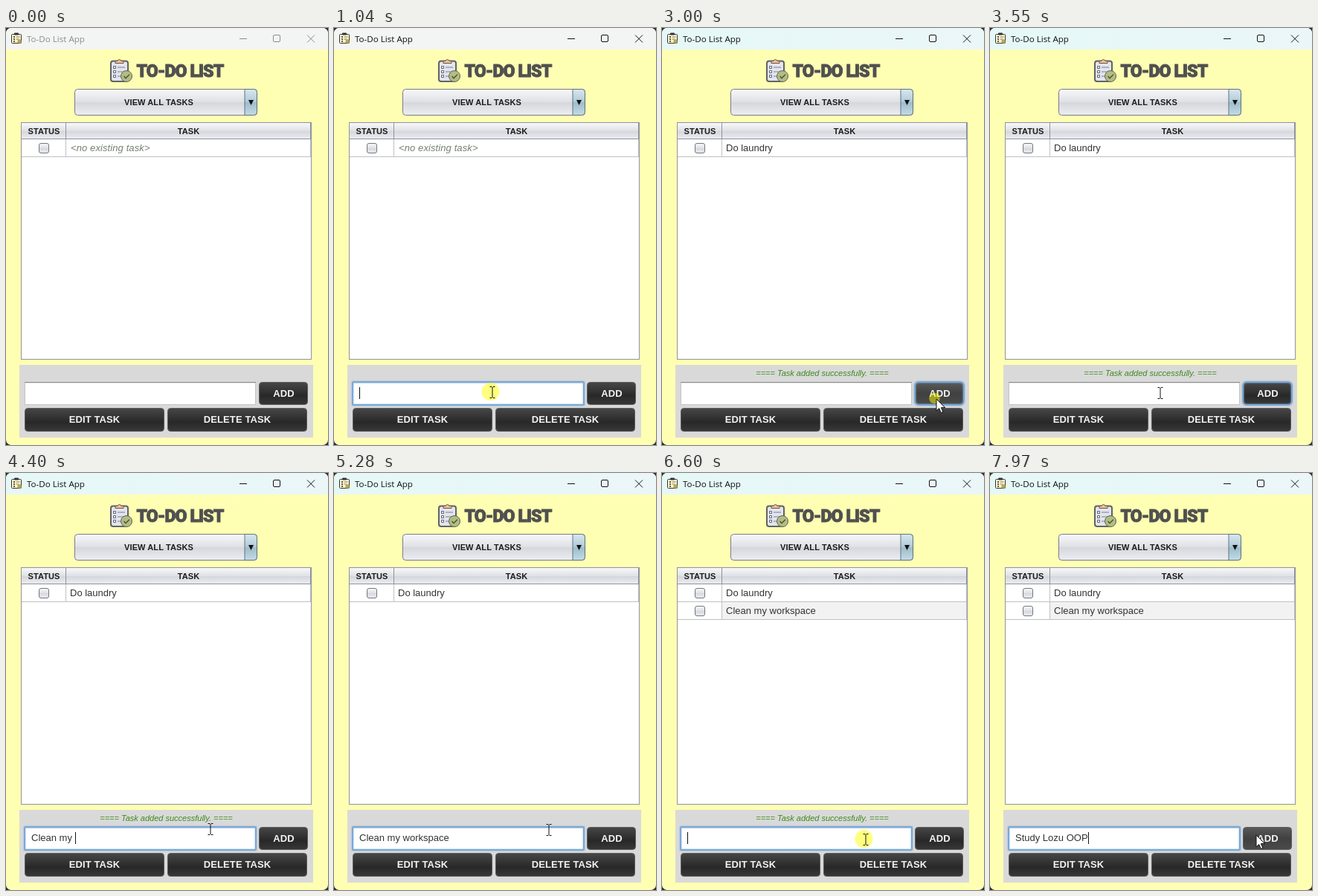
An HTML page that plays this animation: 433 px wide and 562 px high, repeating every 8 s.

```html
<!DOCTYPE html>
<html lang="en">
<head>
<meta charset="utf-8">
<title>To-Do List App</title>
<style>
  html, body { margin: 0; width: 100%; height: 100%; overflow: hidden; background: #262b35; }
  svg { display: block; width: 433px; height: 562px; }
  text { font: 13px "Liberation Sans", Arial, sans-serif; fill: #333; white-space: pre; }
  .mid { text-anchor: middle; }
  .head { font-size: 11px; font-weight: bold; letter-spacing: .1px; fill: #1c1c1c; }
  .label { font-weight: bold; letter-spacing: .1px; fill: #f4f4f4; text-anchor: middle; }
  .italic { font-style: italic; letter-spacing: .1px; fill: #75806f; }
  .message { font-size: 11px; font-style: italic; fill: #3f8a1c; text-anchor: middle; }
  .app-name { font: 11.6px "Open Sans", sans-serif; fill: currentColor; }
  .title {
    font: 900 30px sans-serif; font-stretch: 50%; letter-spacing: -.04em;
    fill: #505050; stroke: #505050; stroke-width: .9;
  }
  .line { fill: none; stroke: currentColor; }
  .button rect { fill: url(#dark); stroke: #5c5c5c; }
  .button.hover rect { fill: url(#darkHover); }
  .ring { fill: none; stroke: #7aa8d6; stroke-width: 2; filter: drop-shadow(0 0 1px #8fbbe4); }
</style>
</head>
<body>
<svg viewBox="0 0 433 562">
  <defs>
    <linearGradient id="silver" x2="0" y2="1">
      <stop stop-color="#f8f8fa"/><stop offset=".48" stop-color="#dfe1e5"/>
      <stop offset=".52" stop-color="#d5d7dd"/><stop offset="1" stop-color="#eceef1"/>
    </linearGradient>
    <linearGradient id="blue" x2="0" y2="1">
      <stop stop-color="#d9e7ee"/><stop offset=".48" stop-color="#b0cad7"/>
      <stop offset=".52" stop-color="#9dbccb"/><stop offset="1" stop-color="#c4dbe5"/>
    </linearGradient>
    <linearGradient id="dark" x2="0" y2="1">
      <stop stop-color="#474747"/><stop offset=".45" stop-color="#303030"/>
      <stop offset=".6" stop-color="#282828"/><stop offset="1" stop-color="#383838"/>
    </linearGradient>
    <linearGradient id="darkHover" x2="0" y2="1">
      <stop stop-color="#5a5a5a"/><stop offset=".5" stop-color="#404040"/><stop offset="1" stop-color="#4b4b4b"/>
    </linearGradient>
    <linearGradient id="tint">
      <stop stop-color="#e5f8f7"/><stop offset="1" stop-color="#ebf6f9"/>
    </linearGradient>
    <clipPath id="window"><rect width="433" height="562" rx="7"/></clipPath>
    <g id="checkbox">
      <rect x="44.5" y="-6.5" width="13" height="13" rx="2.500" fill="url(#silver)" stroke="#74777e"/>
    </g>
  </defs>

  <g clip-path="url(#window)">
    <rect width="433" height="562" fill="#ffffb3"/>
    <rect width="433" height="29" fill="#f3f4f4"/>
    <rect id="barTint" width="433" height="29" fill="url(#tint)"/>
  </g>

  <g>
    <rect x="7.5" y="8.5" width="13" height="12" rx="1" fill="#fff6cf" stroke="#333"/>
    <rect x="11" y="6.5" width="6" height="3" rx="1" fill="#333"/>
    <path d="M10 12h2m-2 3h2m-2 3h2" stroke="#222" stroke-width="1.6"/>
    <path d="M13.5 12h5m-5 3h4" stroke="#777"/>
    <circle cx="18" cy="18" r="2.7" fill="#b9a650"/>
  </g>
  <g id="chrome">
    <text class="app-name" x="28" y="19">To-Do List App</text>
    <path class="line" d="M314 14.5h10M405 9.500l10 10m0-10l-10 10"/>
    <rect class="line" x="359.500" y="9.500" width="9" height="9" rx="1.500"/>
  </g>

  <g>
    <rect x="141" y="44.500" width="23" height="27.500" rx="3" fill="#e2e5ee" stroke="#626266" stroke-width="2"/>
    <path d="M147 47.500v-3h3a2.600 2.600 0 0 1 5 0h3v3z" fill="#efc39a" stroke="#6b5548"/>
    <path d="M144.500 51.500h3v3h-3zm0 6h3v3h-3zm0 6h3v3h-3z" fill="#fff" stroke="#62656e"/>
    <path d="M150 53h10m-10 6h9m-9 6h4" stroke="#9ba0b2" stroke-width="1.500"/>
    <circle cx="162" cy="65" r="7.500" fill="#b3bc83" stroke="#62664f"/>
    <path d="M158.500 65l2.500 2.700 4.800-5" fill="none" stroke="#4d553c" stroke-width="1.500"/>
  </g>
  <text id="title" class="title" x="175.500">TO-DO LIST</text>

  <rect x="92.500" y="82.500" width="245" height="35" rx="4" fill="url(#silver)" stroke="#777c86"/>
  <path d="M321 82.500h12.500a4 4 0 0 1 4 4v27a4 4 0 0 1-4 4H321z" fill="url(#blue)" stroke="#5b7482"/>
  <path d="M326 97h7l-3.500 7z" fill="#111"/>
  <text class="head mid" x="205.500" y="104">VIEW ALL TASKS</text>

  <rect x="20.500" y="127.500" width="390" height="319" fill="#fff" stroke="#8f93a0"/>
  <rect x="21" y="128" width="389" height="22" fill="url(#silver)"/>
  <path d="M21 149.500h389M80.500 128v21M409.500 128v21" stroke="#8f93a0"/>
  <path d="M21 173.500h389M80.500 150v24M409.500 150v24" stroke="#bfc1c5"/>
  <text class="head mid" x="51" y="143">STATUS</text>
  <text class="head mid" x="245.500" y="143">TASK</text>
  <use href="#checkbox" y="162"/>
  <text id="empty" class="italic" x="87" y="166">&lt;no existing task&gt;</text>
  <text id="first" x="86" y="166">Do laundry</text>
  <g id="second">
    <rect x="81" y="174" width="329" height="23" fill="#f2f2f2"/>
    <path d="M21 197.500h389M80.500 174v24M409.500 174v24" stroke="#bfc1c5"/>
    <use href="#checkbox" y="186"/>
    <text x="86" y="190">Clean my workspace</text>
  </g>

  <rect x="18" y="454" width="395" height="98" fill="#d9d9d9"/>
  <text id="message" class="message" x="215.500" y="469">==== Task added successfully. ====</text>
  <rect x="25.500" y="477.500" width="310" height="30" fill="#fff" stroke="#c4c4c4"/>
  <path d="M25 477.500h311" stroke="#8d8d8d"/>
  <path d="M26 478.500h309" stroke="#e0e0e0"/>
  <rect id="fieldRing" class="ring" x="25" y="477" width="311" height="31" rx="1"/>
  <text id="typed" x="34" y="496"></text>
  <path id="caret" d="M.5 484v16" stroke="#111"/>

  <g id="add" class="button">
    <rect x="340.500" y="477.500" width="65" height="30" rx="4"/>
    <text class="label" x="373.500" y="497">ADD</text>
  </g>
  <rect id="addRing" class="ring" x="340" y="477" width="66" height="31" rx="5"/>
  <g class="button">
    <rect x="25.500" y="512.500" width="187" height="31" rx="4"/>
    <text class="label" x="119" y="532">EDIT TASK</text>
  </g>
  <g id="delete" class="button">
    <rect x="217.500" y="512.500" width="187" height="31" rx="4"/>
    <text class="label" x="311" y="532">DELETE TASK</text>
  </g>

  <g id="pointer">
    <circle id="halo" cx="-2.500" cy="-1" fill="#ff0" fill-opacity=".5"/>
    <path id="beam" d="M-3.500-7.500h2.500l1 1 1-1h2.500M0-6.500v13M-3.500 7.500h2.500l1-1 1 1h2.500" fill="none" stroke="#111"/>
    <path id="arrow" d="M0 0v16l3.700-3.500 2.500 6 2.700-1.100-2.500-5.800h5.200z" fill="#fff" stroke="#111"/>
  </g>
</svg>

<script>
const LOOP = 8000;
const ACTIVATED = 950;
const BLINK = 500;

const typing = [
  { text: "Do laundry", focus: 950, start: 1450, end: 2230, sent: 2980 },
  { text: "Clean my workspace", focus: 3990, start: 4030, end: 4770, sent: 5720 },
  { text: "Study Lozu OOP", focus: 6540, start: 6620, end: 7560, sent: LOOP }
];
const messages = [[2980, 4800], [5720, 7390]];
const clicks = [920, 2800, 3990, 5700, 6540];

// time, x, y of the pointer's hot spot
const path = [
  [100, 310, 575], [900, 213, 491], [1040, 213, 491], [1240, 215, 493], [2320, 215, 493],
  [2750, 369, 500], [3150, 369, 500], [3550, 229, 492], [3700, 215, 490],
  [3950, 275, 480], [5180, 275, 479], [5600, 370, 493], [5850, 370, 493],
  [6450, 274, 494], [7450, 274, 494], [7930, 358, 488], [LOOP, 358, 488]
];

const $ = id => document.getElementById(id);
const show = (id, on) => { $(id).style.visibility = on ? "visible" : "hidden"; };
const clamp = v => Math.min(1, Math.max(0, v));
const within = (t, [from, to]) => t >= from && t < to;
const inside = ([x, y], left, top, right, bottom) =>
  x >= left && x <= right && y >= top && y <= bottom;

function pointerAt(t) {
  const next = Math.max(1, path.findIndex(p => p[0] > t));
  const [t0, x0, y0] = path[next - 1], [t1, x1, y1] = path[next];
  const k = clamp((t - t0) / (t1 - t0));
  const eased = k * k * (3 - 2 * k);
  return [x0 + (x1 - x0) * eased, y0 + (y1 - y0) * eased];
}

function drawWindow(t) {
  $("barTint").style.opacity = clamp((t - 1040) / 200);
  $("chrome").style.color = t >= ACTIVATED ? "#111" : "#8b8b8b";
}

function drawTasks(t) {
  const [one, two] = typing;
  show("empty", t < one.sent);
  show("first", t >= one.sent);
  show("second", t >= two.sent);
  show("message", messages.some(span => within(t, span)));
}

function drawField(t) {
  const entry = typing.find(e => within(t, [e.focus, e.sent]));
  show("fieldRing", entry);
  show("addRing", !entry && t > ACTIVATED);
  show("caret", false);
  $("typed").textContent = "";
  if (!entry) return;

  const { text, focus, start, end } = entry;
  const step = (end - start) / text.length;
  const count = Math.floor(clamp((t - start) / (end - start)) * text.length + 1e-6);
  $("typed").textContent = text.slice(0, count);
  const x = 34 + Math.round(count ? $("typed").getComputedTextLength() : 0);
  const since = t - (count ? start + count * step : focus);
  $("caret").setAttribute("transform", `translate(${x} 0)`);
  show("caret", since % (2 * BLINK) < BLINK);
}

function drawPointer(t) {
  const at = pointerAt(t);
  const overField = inside(at, 25, 477, 336, 508);
  const pressed = clicks.find(c => within(t, [c, c + 280]));
  const radius = pressed === undefined ? 0 : 12 * clamp((pressed + 280 - t) / 130);
  $("pointer").setAttribute("transform", `translate(${at.map(Math.round)})`);
  $("halo").setAttribute("r", radius);
  show("pointer", t >= 100);
  $("beam").style.display = overField ? "" : "none";
  $("arrow").style.display = overField ? "none" : "";
  $("add").classList.toggle("hover", inside(at, 340, 477, 406, 508));
  $("delete").classList.toggle("hover", inside(at, 217, 512, 405, 544));
}

// Set the heading in the narrowest installed face, centred on the icon.
function fitTitle() {
  const title = $("title");
  const widthIn = family => {
    title.style.fontFamily = `"${family}", sans-serif`;
    return title.getComputedTextLength();
  };
  const faces = ["Noto Sans", "Roboto", "Open Sans", "Liberation Sans"]
    .map(family => ({ family, width: widthIn(family) }))
    .sort((a, b) => a.width - b.width);
  const size = Math.min(31, 30 * 117 / faces[0].width);
  title.style.fontFamily = `"${faces[0].family}", sans-serif`;
  title.style.fontSize = size + "px";
  title.setAttribute("y", 58 + size * .36);
}

function frame() {
  const t = (performance.now() - began) % LOOP;
  drawWindow(t);
  drawTasks(t);
  drawField(t);
  drawPointer(t);
  requestAnimationFrame(frame);
}

fitTitle();
const began = performance.now();
frame();
</script>
</body>
</html>
```
